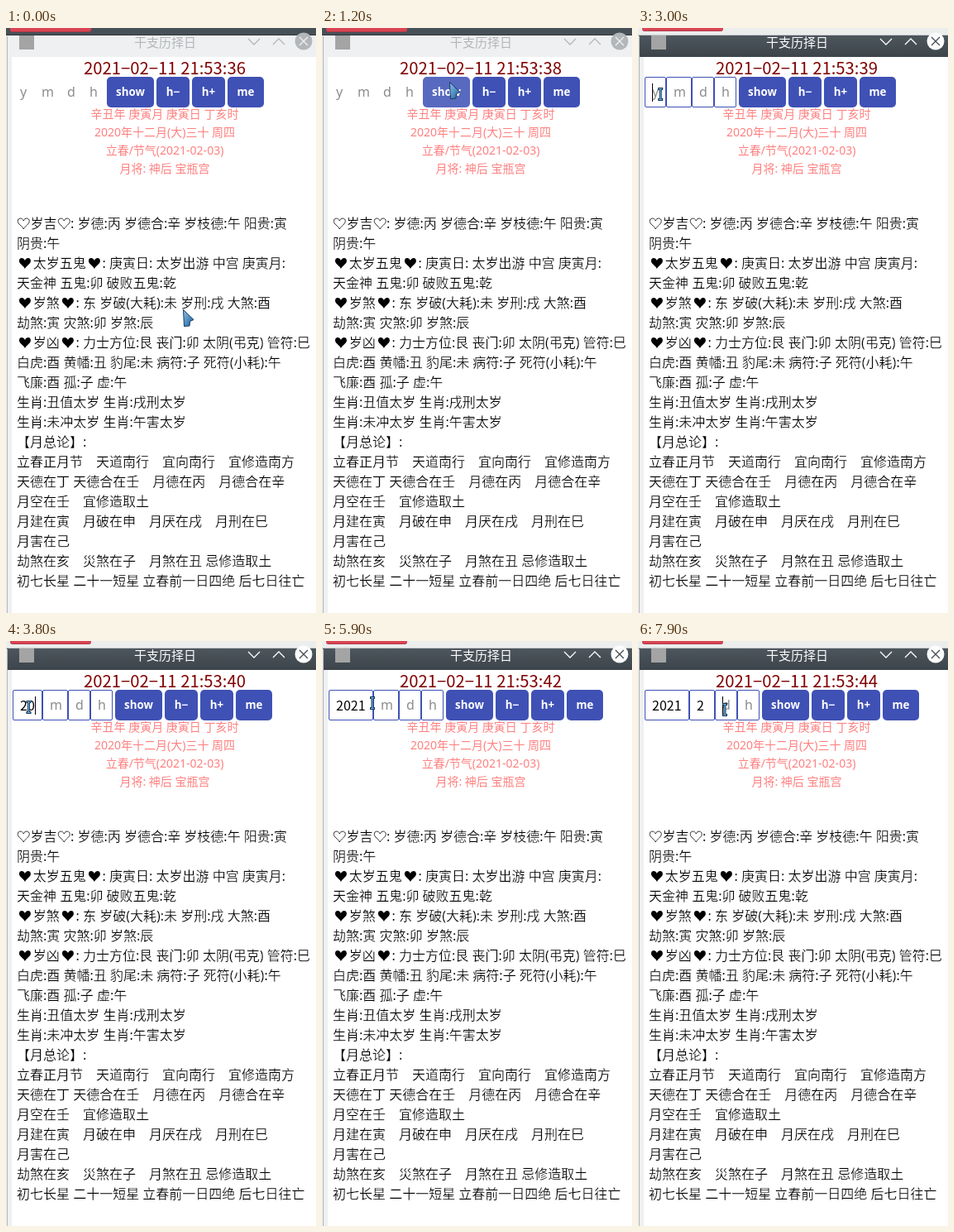
Animation, 375 px wide and 707 px high, one loop 8000 ms. Source, as an HTML page:

```html
<!DOCTYPE html>
<html lang="zh-CN">
<head>
<meta charset="utf-8">
<style>
  html, body { margin: 0; width: 100%; height: 100%; overflow: hidden; background: #eff0f1; }
  body { position: relative; font: 16px/24px "Noto Sans", "Noto Sans CJK SC", "Noto Sans CJK", sans-serif; color: #000; }
  body > *, .row > * { position: absolute; box-sizing: border-box; white-space: pre; }
  #page { left: 7px; top: 35px; width: 368px; height: 672px; background: #fff; }
  #edge { left: 1px; top: 10px; width: 1px; height: 697px; background: #b4b7ba; }
  #strip { left: 0; top: 0; width: 375px; height: 9px; background: #475057; border-bottom: 1px solid #30363b; }
  #tab { left: 5px; top: -6px; width: 98px; height: 11px; background: #da4453; border-radius: 3px; border-bottom: 1px solid #b03a48; }
  #bar { left: 1px; top: 9px; width: 374px; height: 26px; background: #eff0f1; }
  #title { left: 0; width: 385px; top: 5px; text-align: center; font-size: 15px; color: #b3b7ba; }
  #icons { left: 0; top: 0; color: #b3b7ba; --x: #eff0f1; }
  .active #strip { background: #eceded; border-color: #c9cbcd; }
  .active #tab { height: 10px; }
  .active #bar { background: linear-gradient(#4d565d, #3d454b); }
  .active #title, .active #icons { color: #fcfcfc; --x: #434b52; }
  #clock, .field.full { font-family: "Noto Sans CJK SC", "Noto Sans CJK", sans-serif; }
  #clock { left: 0; width: 384px; top: 35px; text-align: center; font-size: 20.3px; color: #800000; }
  #pink { left: 0; width: 384px; top: 93px; text-align: center; font-size: 14px; line-height: 22px; color: #ff8080; }
  /* the white outline thins the strokes */
  #text { left: 13px; top: 224px; font-weight: 300; -webkit-text-stroke: .25px #fff; }
  #text svg { vertical-align: -2px; }
  .row { left: 0; top: 59px; }
  .row > * { top: 0; height: 37px; line-height: 37px; }
  .btn { background: #3f51b5; color: #fff; border-radius: 5px; font-size: 13.333px; font-weight: 600; text-align: center; }
  .btn.hover { background: #5869c0; }
  .field { padding-left: 9px; color: #8c8c8c; }
  .field.full { color: #000; }
  .active .field { border: 1px solid #3f51b5; padding-left: 8px; line-height: 35px; border-radius: 2px; }
  #caret { width: 1px; height: 22px; top: 67px; background: #000; }
  #cursor { left: 0; top: 0; }
</style>
</head>
<body>
<div id="page"></div>
<div id="strip"></div>
<div id="tab"></div>
<div id="bar"></div>
<div id="edge"></div>
<div id="title">干支历择日</div>
<svg id="icons" width="375" height="35" fill="none" stroke="currentColor" stroke-width="1.3">
  <rect x="16" y="9" width="18" height="17" fill="#a4a4a4" stroke="none"/>
  <path d="M293 13l7 7 7-7M323 20l7-7 7 7"/>
  <circle cx="360" cy="16" r="10.5" fill="currentColor" stroke="none"/>
  <path d="M355 11l10 10M365 11l-10 10" stroke="var(--x)"/>
</svg>
<div id="clock"></div>
<div id="pink">辛丑年 庚寅月 庚寅日 丁亥时
2020年十二月(大)三十 周四
立春/节气(2021-02-03)
月将: 神后 宝瓶宫</div>
<div id="text">♡岁吉♡: 岁德:丙 岁德合:辛 岁枝德:午 阳贵:寅
阴贵:午
♥太岁五鬼♥: 庚寅日: 太岁出游 中宫 庚寅月:
天金神 五鬼:卯 破败五鬼:乾
♥岁煞♥: 东 岁破(大耗):未 岁刑:戌 大煞:酉
劫煞:寅 灾煞:卯 岁煞:辰
♥岁凶♥: 力士方位:艮 丧门:卯 太阴(弔克) 管符:巳
白虎:酉 黄幡:丑 豹尾:未 病符:子 死符(小耗):午
飞廉:酉 孤:子 虚:午
生肖:丑值太岁 生肖:戌刑太岁
生肖:未冲太岁 生肖:午害太岁
【月总论】:
立春正月节　天道南行　宜向南行　宜修造南方
天德在丁 天德合在壬　月德在丙　月德合在辛
月空在壬　宜修造取土
月建在寅　月破在申　月厌在戌　月刑在巳
月害在己
劫煞在亥　災煞在子　月煞在丑 忌修造取土
初七长星 二十一短星 立春前一日四绝 后七日往亡</div>
<div class="row" id="row"></div>
<div id="caret"></div>
<svg id="cursor" width="375" height="707">
  <defs><linearGradient id="blue" x2="1" y2="1">
    <stop stop-color="#8cc4ea"/><stop offset="1" stop-color="#1d5c9a"/>
  </linearGradient></defs>
  <path id="arrow" d="M.5 .5L13 12.5L8.5 14.5L8 20L1.5 20.5Z" fill="url(#blue)" stroke="#163a5f" stroke-linejoin="round"/>
  <g id="beam" fill="none" stroke-linecap="square">
    <path d="M-1.5-6.5H1.5M0-6V6M-1.5 6.5H1.5" stroke="#12304d" stroke-width="3"/>
    <path d="M-1.5-6.5H1.5M0-6V6M-1.5 6.5H1.5" stroke="#6db4e6" stroke-width="1.2"/>
  </g>
</svg>
<script>
const LOOP = 8000, STEP = 100, ACTIVE = 3000, BEAM = 2000;
const $ = id => document.getElementById(id);

const heart = (w, attrs) =>
  `<svg width="${w}" height="15" viewBox="${-w / 2} 0 ${w} 15"><path ${attrs} d="M0 14C-2 10-7 8-7 4.5C-7 0-1.5 0 0 4C1.5 0 7 0 7 4.5C7 8 2 10 0 14Z"/></svg>`;
$("text").innerHTML = $("text").innerHTML
  .replace(/♥/g, heart(19.8, ""))
  .replace(/♡/g, heart(16.5, 'fill="none" stroke="#000" stroke-width=".8"'));

const add = (cls, text) => {
  const el = document.createElement("div");
  el.className = cls;
  el.textContent = text;
  $("row").append(el);
  return el;
};
const hints = "ymdh", hintWidths = [26, 31, 27, 27];
const fields = [...hints].map(c => add("field", c));
const buttons = ["show", "h\u2212", "h+", "me"].map(s => add("btn", s));
const buttonWidths = [57, 40, 40, 44];

// time, focused field, its text
const typing = [
  [2800, 0, ""], [3600, 0, "2"], [3800, 0, "20"], [4100, 0, "202"], [5100, 0, "2021"],
  [6600, 1, ""], [7400, 1, "2"], [7900, 2, ""]
];
// time, x, y of the pointer
const path = [
  [100, 214, 340], [600, 188, 210], [1000, 164, 92], [1200, 154, 65], [1400, 149, 75], [1600, 149, 94],
  [1700, 149, 94], [1900, 66, 87], [2300, 27, 80], [5700, 28, 80], [5900, 61, 75], [6100, 75, 72],
  [6200, 75, 72], [6400, 76, 74], [7100, 76, 74], [7400, 92, 94], [7600, 105, 83]
];

function pointer(t) {
  const i = path.findIndex(p => p[0] > t);
  if (i < 1) return path[i ? path.length - 1 : 0].slice(1);
  const [t0, x0, y0] = path[i - 1], [t1, x1, y1] = path[i];
  const k = (t - t0) / (t1 - t0);
  return [x0 + (x1 - x0) * k, y0 + (y1 - y0) * k];
}

function place(el, x, w) {
  el.style.left = x + "px";
  el.style.width = w + "px";
}

function draw(t) {
  const active = t >= ACTIVE;
  document.body.classList.toggle("active", active);
  $("clock").textContent = "2021\u221202\u221211 21:53:" + (37 + Math.floor((t - 185) / 1012));

  const values = ["", "", "", ""];
  let last = typing[0];
  for (const e of typing) if (e[0] <= t) {
    last = e;
    values[e[1]] = e[2];
  }

  let x = 8;
  fields.forEach((el, i) => {
    const v = values[i];
    const w = i ? hintWidths[i] : v ? 18 + 9 * v.length : hintWidths[0];
    el.textContent = v || hints[i];
    el.classList.toggle("full", !!v);
    place(el, x, w);
    if (last[1] === i) $("caret").style.left = x + 9 + 9 * v.length + "px";
    x += w;
  });
  buttons.forEach((el, i) => {
    place(el, x + 3, buttonWidths[i]);
    x += 3 + buttonWidths[i];
  });
  $("caret").hidden = !active || (t - last[0]) % 1000 >= 500;

  const [px, py] = pointer(t), beam = t >= BEAM;
  const shape = $(beam ? "beam" : "arrow");
  $("beam").style.display = $("arrow").style.display = "none";
  shape.style.display = "";
  shape.setAttribute("transform", `translate(${px} ${py})`);
  buttons[0].classList.toggle("hover", !beam && px > 122 && px < 179 && py > 59 && py < 96);
}

const start = performance.now();
function tick() {
  const t = (performance.now() - start) % LOOP;
  draw(Math.floor(t / STEP) * STEP);
  requestAnimationFrame(tick);
}
tick();
</script>
</body>
</html>
```
